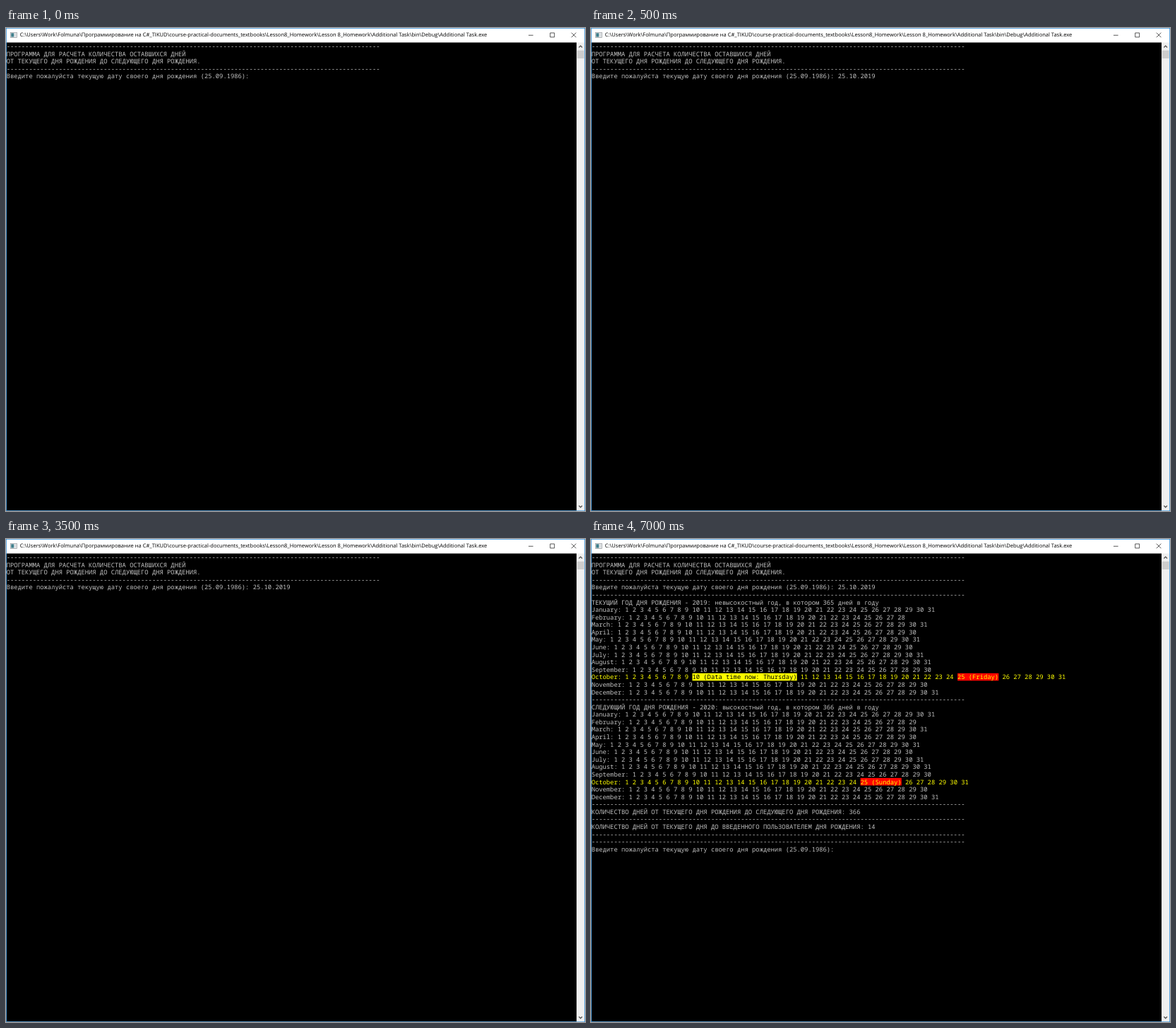
An HTML page for the animation above (8 s loop, 820 px wide and 683 px high).

```html
<!DOCTYPE html>
<html lang="ru">
<head>
<meta charset="utf-8">
<title>Console</title>
<style>
  html, body { margin: 0; width: 100%; height: 100%; overflow: hidden; background: #fff; }
  .window {
    position: absolute; left: 0; top: 0; width: 1240px; height: 1033px;
    transform: scale(calc(820 / 1240)); transform-origin: 0 0;
    background: #fff; overflow: hidden; text-rendering: geometricPrecision;
  }
  .title {
    position: absolute; left: 30px; top: 0; white-space: pre; color: #000;
    font: 11.4px/30px "Open Sans", sans-serif;
  }
  .screen {
    position: absolute; left: 1px; top: 31px; width: 1221px; height: 1001px;
    margin: 0; background: #000; color: #c0c0c0;
    font: 13.3333px/16px "Noto Sans Mono", monospace;
  }
  svg { position: absolute; left: 0; top: 0; }
  .month { color: #ff0; }
  .today, .birthday { display: inline-block; height: 16px; }
  .today { background: #ff0; color: #000; }
  .birthday { background: #f00; color: #ff0; }
  #answer { animation: answer 8s step-end infinite; }
  #report { animation: report 8s step-end infinite; }
  @keyframes answer { 0% { visibility: hidden; } 6.25%, 100% { visibility: visible; } }
  @keyframes report { 0% { visibility: hidden; } 68.75%, 100% { visibility: visible; } }
</style>
</head>
<body>
<div class="window">
  <div class="title">C:\Users\Work\Folmuna\Программирование на C#_TIKUD\course-practical-documents_textbooks\Lesson8_Homework\Lesson 8_Homework\Additional Task\bin\Debug\Additional Task.exe</div>
  <pre class="screen"><span id="intro"></span><span id="answer">25.10.2019</span>
<span id="report"></span></pre>
  <svg width="1240" height="1033" fill="none">
    <!-- window icon -->
    <rect x="9.5" y="9.5" width="14" height="11" fill="#f4f4f4" stroke="#8a8f94"/>
    <rect x="11" y="11" width="6" height="8" fill="#3f7f8c"/>
    <rect x="18" y="11" width="4" height="8" fill="#d8dcdf"/>
    <!-- caption buttons -->
    <path d="M1119 15.5h10M1165.5 10.5h9v9h-9zM1211 10l10 10M1221 10l-10 10" stroke="#000"/>
    <!-- scrollbar -->
    <rect x="1222" y="31" width="17" height="1001" fill="#f0f0f0"/>
    <rect x="1223" y="48" width="15" height="17" fill="#cdcdcd"/>
    <path d="M1227 41.5l3.5-3.5 3.5 3.5M1227 1021.5l3.5 3.5 3.5-3.5" stroke="#505050" stroke-width="2"/>
    <rect x=".5" y=".5" width="1239" height="1032" stroke="#1883d7"/>
  </svg>
</div>
<script>
  const RULE = '-'.repeat(100);
  const PROMPT = 'Введите пожалуйста текущую дату своего дня рождения (25.09.1986): ';
  const MONTHS = ['January', 'February', 'March', 'April', 'May', 'June', 'July',
    'August', 'September', 'October', 'November', 'December'];
  const OCTOBER = 9;

  const mark = (kind, text) => `<span class="${kind}">${text}</span>`;

  function monthLine(year, month, marks) {
    const count = new Date(year, month + 1, 0).getDate();
    const days = Array.from({ length: count }, (_, i) =>
      month === OCTOBER && marks[i + 1] || i + 1);
    const line = `${MONTHS[month]}: ${days.join(' ')}`;
    return month === OCTOBER ? mark('month', line) : line;
  }

  const calendar = (year, marks) => MONTHS.map((_, month) => monthLine(year, month, marks));

  document.getElementById('intro').innerHTML = [
    RULE,
    'ПРОГРАММА ДЛЯ РАСЧЕТА КОЛИЧЕСТВА ОСТАВШИХСЯ ДНЕЙ',
    'ОТ ТЕКУЩЕГО ДНЯ РОЖДЕНИЯ ДО СЛЕДУЮЩЕГО ДНЯ РОЖДЕНИЯ.',
    RULE,
    PROMPT
  ].join('\n');

  document.getElementById('report').innerHTML = [
    RULE,
    'ТЕКУЩИЙ ГОД ДНЯ РОЖДЕНИЯ - 2019: невысокостный год, в котором 365 дней в году',
    ...calendar(2019, {
      10: mark('today', '10 (Data time now: Thursday)'),
      25: mark('birthday', '25 (Friday)')
    }),
    RULE,
    'СЛЕДУЮЩИЙ ГОД ДНЯ РОЖДЕНИЯ - 2020: высокостный год, в котором 366 дней в году',
    ...calendar(2020, { 25: mark('birthday', '25 (Sunday)') }),
    RULE,
    'КОЛИЧЕСТВО ДНЕЙ ОТ ТЕКУЩЕГО ДНЯ РОЖДЕНИЯ ДО СЛЕДУЮЩЕГО ДНЯ РОЖДЕНИЯ: 366',
    RULE,
    'КОЛИЧЕСТВО ДНЕЙ ОТ ТЕКУЩЕГО ДНЯ ДО ВВЕДЕННОГО ПОЛЬЗОВАТЕЛЕМ ДНЯ РОЖДЕНИЯ: 14',
    RULE,
    RULE,
    PROMPT
  ].join('\n');
</script>
</body>
</html>
```
